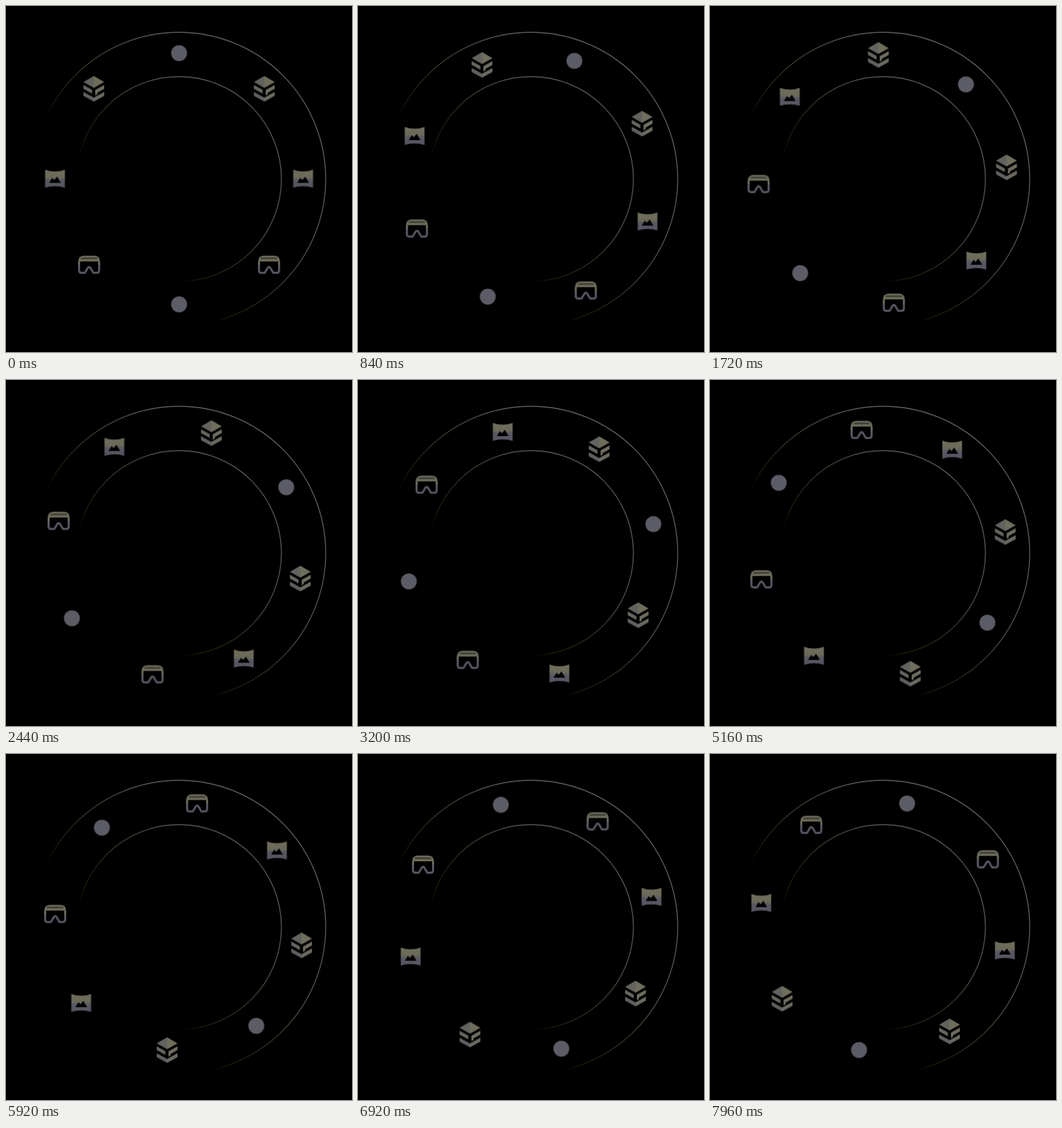
An HTML page for the animation above (8 s loop, 500 px wide and 500 px high).

```html
<!DOCTYPE html>
<html lang="en">
<head>
<meta charset="utf-8">
<title>Orbiting icons</title>
<style>
  html, body { margin: 0; width: 100%; height: 100%; overflow: hidden; background: #000; }
  svg { display: block; width: 100vw; height: 100vh; }
  .wheel { animation: turn 8s steps(200) infinite; }
  .upright { animation: unturn 8s steps(200) infinite; }
  @keyframes turn { to { transform: rotate(192deg); } }
  @keyframes unturn { to { transform: rotate(-192deg); } }
</style>
</head>
<body>
<svg viewBox="0 0 500 500">
  <defs>
    <!-- Rings fade out towards the lower left -->
    <linearGradient id="fade" gradientUnits="userSpaceOnUse" x1="180" y1="306.5" x2="414.7" y2="116.9">
      <stop offset="0" stop-color="#000"/>
      <stop offset=".06" stop-color="#1a1a08"/>
      <stop offset=".3" stop-color="#39392a"/>
      <stop offset=".55" stop-color="#53534a"/>
      <stop offset="1" stop-color="#66665d"/>
    </linearGradient>
    <linearGradient id="metal" gradientUnits="userSpaceOnUse" x1="0" y1="-13" x2="0" y2="13">
      <stop offset="0" stop-color="#706f5d"/>
      <stop offset=".46" stop-color="#6b6a59"/>
      <stop offset=".54" stop-color="#5a5a66"/>
      <stop offset="1" stop-color="#555562"/>
    </linearGradient>

    <circle id="orb" r="11.5" fill="#5c5c66"/>

    <g id="stack">
      <path fill="#62625f" d="M0-18.5V-1.3L-15-9.8Z"/>
      <path fill="#6f6e5c" d="M0-18.5L15-9.8 0-1.3Z"/>
      <path fill="#66665e" d="M-15-5.5L-2.5 1.5V7L-15 .1Z"/>
      <path fill="#6e6d5f" d="M15-5.5L2 1.8V9.5L5 8V5.8L15 .1Z"/>
      <path fill="#5f5f60" d="M-15 4.5L0 12.8V18.5L-15 10.2Z"/>
      <path fill="#6b6a60" d="M15 4.5L0 12.8V18.5L15 10.2Z"/>
    </g>

    <g id="panorama">
      <path fill="url(#metal)" d="M-14.3-13Q0-8 14.3-13V13Q0 8.5-14.3 13Z"/>
      <path d="M-8.5 6L-4-1.2-1.2 2 3-3 8.5 6Z"/>
    </g>

    <g id="headset" fill="none" stroke="url(#metal)" stroke-width="3" stroke-linejoin="round">
      <path d="M-14.5-3Q-14.5-11.7-8-11.7H8Q14.5-11.7 14.5-3V8Q14.5 11.6 11 11.6H6.2L2 4.4Q0 1.8-2 4.4L-6.2 11.6H-11Q-14.5 11.6-14.5 8Z"/>
      <path stroke="#3f3f38" d="M-11.5-9.2H11.5"/>
      <path stroke-width="3.4" d="M-13-6.6L13-6.59"/>
    </g>
  </defs>

  <rect width="500" height="500"/>
  <g fill="none" stroke="url(#fade)" stroke-width="1.3">
    <circle cx="250" cy="250" r="212"/>
    <circle cx="250" cy="250" r="148"/>
  </g>

  <g transform="translate(250.1 249.6)">
    <g class="wheel">
      <g transform="translate(0 -181.5)"><use class="upright" href="#orb"/></g>
      <g transform="translate(123.2 -130)"><use class="upright" href="#stack"/></g>
      <g transform="translate(179.3 0)"><use class="upright" href="#panorama"/></g>
      <g transform="translate(130 124.5)"><use class="upright" href="#headset"/></g>
      <g transform="translate(0 181.5)"><use class="upright" href="#orb"/></g>
      <g transform="translate(-130 124.5)"><use class="upright" href="#headset"/></g>
      <g transform="translate(-179.3 0)"><use class="upright" href="#panorama"/></g>
      <g transform="translate(-123.2 -130)"><use class="upright" href="#stack"/></g>
    </g>
  </g>
</svg>
</body>
</html>
```
